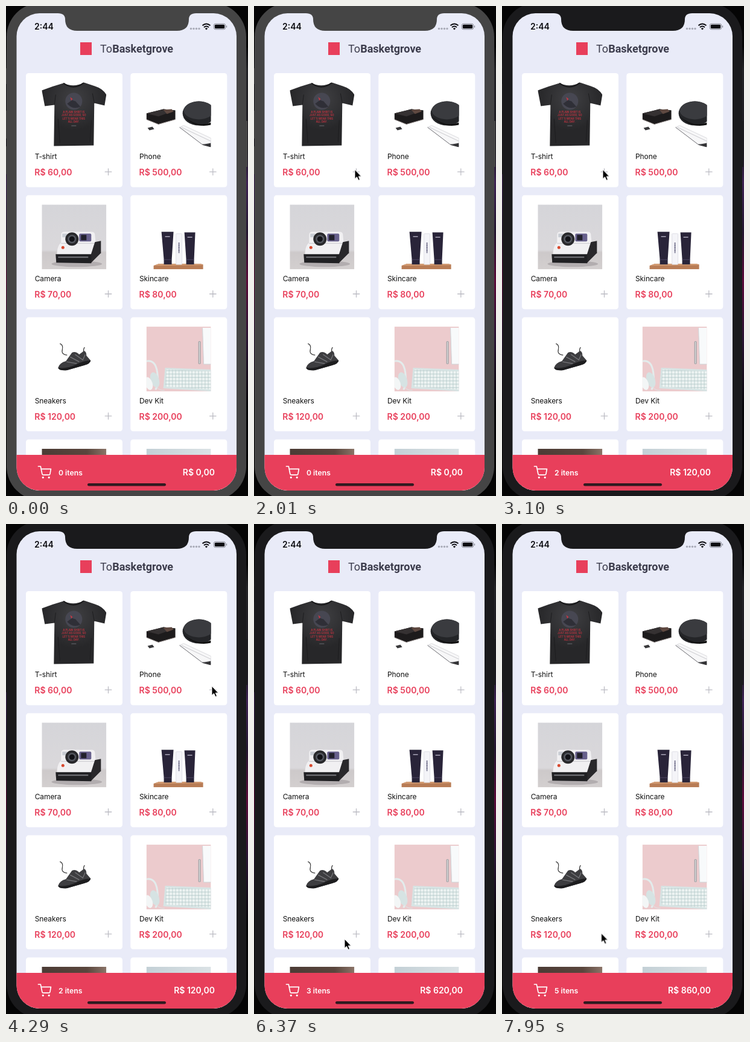
Animation, 401 px wide and 810 px high, one loop 8000 ms. Source, as an HTML page:

```html
<!DOCTYPE html>
<html lang="en">
<head>
<meta charset="utf-8">
<title>Shop</title>
<style>
  html, body { margin: 0; width: 100%; height: 100%; overflow: hidden; background: #060606; }
  #stage { display: block; width: 401px; height: 810px; font-family: Inter, "Open Sans", sans-serif; }
  .brand { font: 400 18px Roboto, sans-serif; fill: #3d3d4d; }
  .bold { font-weight: 700; }
  .clock { font-size: 14px; font-weight: 600; fill: #0c0c10; }
  .name { font-size: 12px; letter-spacing: -.1px; fill: #111; }
  .price { font-size: 14px; font-weight: 600; fill: #e83f5b; }
  .count { font-size: 12.2px; font-weight: 600; fill: #fff; }
  .total { font-size: 14px; font-weight: 600; fill: #fff; text-anchor: end; }
  .print { font-size: 4.3px; font-weight: 700; fill: #b5323f; text-anchor: middle; }
  .plus { stroke: #bcbcc4; stroke-width: 1.3; stroke-linecap: round; }
</style>
</head>
<body>
<svg id="stage" viewBox="0 0 401 810">
  <defs>
    <linearGradient id="desk" x2="0" y2="1">
      <stop offset=".08" stop-color="#050506"/><stop offset=".13" stop-color="#232326"/>
      <stop offset=".3" stop-color="#1d1a22"/><stop offset=".36" stop-color="#3f2354"/>
      <stop offset=".46" stop-color="#241730"/><stop offset=".56" stop-color="#5c0b3a"/>
      <stop offset=".68" stop-color="#2a1533"/><stop offset=".82" stop-color="#060607"/>
    </linearGradient>
    <linearGradient id="wall" x2="0" y2="1">
      <stop offset="0" stop-color="#d5d5d9"/><stop offset=".7" stop-color="#dad8db"/>
      <stop offset=".74" stop-color="#cdc9ca"/><stop offset="1" stop-color="#d3cfcf"/>
    </linearGradient>
    <linearGradient id="wood">
      <stop offset="0" stop-color="#4b3b35"/><stop offset=".7" stop-color="#5a463d"/><stop offset="1" stop-color="#8b7468"/>
    </linearGradient>
    <linearGradient id="mist">
      <stop offset="0" stop-color="#c3d0d6"/><stop offset="1" stop-color="#dbe2e5"/>
    </linearGradient>
    <radialGradient id="cloth" cx=".5" cy=".25">
      <stop offset="0" stop-color="#404043"/><stop offset="1" stop-color="#272729"/>
    </radialGradient>
    <pattern id="keys" width="5.4" height="5.6" patternUnits="userSpaceOnUse">
      <rect width="5.4" height="5.6" fill="#bfd2d2"/><rect x=".5" y=".5" width="4.4" height="4.5" rx=".8" fill="#eef4f3"/>
    </pattern>
    <clipPath id="screen"><rect x="17.5" y="12" width="364.5" height="789" rx="38"/></clipPath>
  </defs>

  <rect width="401" height="810" fill="url(#desk)"/>
  <path d="M0 0H60L0 70ZM401 0H341L401 70ZM0 810H60L0 740ZM401 810H341L401 740Z" fill="#050505"/>
  <g id="body" fill="currentColor">
    <rect x="1" y="-5" width="397" height="822" rx="56"/>
    <path d="M0 103h3v26H0zM0 173h3v46H0zM0 232h3v46H0zM397 190h3v76h-3z"/>
  </g>

  <g clip-path="url(#screen)">
    <rect x="17" y="11" width="366" height="791" fill="#e9ebf8"/>
    <rect x="123" y="60" width="19" height="21" fill="#e83f5b"/>
    <text class="brand" x="156" y="77">To<tspan class="bold">Basketgrove</tspan></text>
    <g id="cards"></g>
    <rect x="17" y="742" width="366" height="60" fill="#e83f5b"/>
    <g fill="none" stroke="#fff" stroke-width="1.7" stroke-linecap="round" stroke-linejoin="round">
      <path d="M53.5 761h3.8l2.6 12.6q.4 1.6 2 1.6h9q1.6 0 2-1.6l1.5-8.2H58.2"/>
      <circle cx="61.3" cy="779.3" r=".8"/><circle cx="71.2" cy="779.3" r=".8"/>
    </g>
    <g id="totals"></g>
    <rect x="135" y="789" width="130" height="4.6" rx="2.3" fill="#301a20"/>
  </g>

  <path id="notch" fill="currentColor" d="M86 10V12Q98 12 98 22Q98 41 118 41H283Q303 41 303 22Q303 12 315 12V10Z"/>
  <text class="clock" x="47" y="39">2:44</text>
  <g fill="#a9abb8">
    <circle cx="306.500" cy="37.500" r="1.700"/><circle cx="311" cy="37.500" r="1.700"/>
    <circle cx="315.500" cy="37.500" r="1.700"/><circle cx="320" cy="37.500" r="1.700"/>
  </g>
  <g fill="none" stroke="#0c0c10" stroke-width="2">
    <path d="M325.500 32.300q6.500-5.600 13 0M328 35.200q4-3.400 8 0"/>
    <path d="M332 39.500l-2.200-2.300q2.200-1.700 4.400 0z" fill="#0c0c10" stroke="none"/>
    <rect x="344.300" y="29.300" width="19.400" height="9.400" rx="2.800" stroke="#8b8d98" stroke-width="1"/>
    <rect x="345.800" y="30.800" width="16.400" height="6.400" rx="1.500" fill="#0c0c10" stroke="none"/>
    <path d="M365.500 32.500v3" stroke="#8b8d98" stroke-width="1.300"/>
  </g>

  <path id="cursor" d="M0 0V15.300L3.500 12.100L6 17.600L8.500 16.500L6.200 11.200H10.800Z" fill="#000" stroke="#fff" stroke-width="1" stroke-linejoin="round"/>
</svg>

<script>
const LOOP = 8000;
const $ = id => document.getElementById(id);

const art = {
  shirt: `
    <path d="M36 1Q53 9 70 0L88 6Q101 10 107 20L104 38L87 34L86 104L20 105L21 37L5 39L0 13Q18 6 36 1Z" fill="url(#cloth)"/>
    <path d="M36 1Q53 14 70 0" fill="none" stroke="#19191b" stroke-width="2"/>
    <path d="M21 37L23 20M87 34L84 18M30 100L27 60M80 98L82 62" stroke="#1d1d1f" fill="none"/>
    <circle cx="53" cy="31" r="14" fill="#474752"/>
    <path d="M42 35L50 29L56 31L64 40Q52 46 42 35Z" fill="#2f2f37"/>
    <path d="M47 24l4 3l-2 3z" fill="#c23845"/>
    <g class="print"><text x="53" y="50">A PLAIN SHIRT IS</text><text x="53" y="55.500">JUST AS GOOD, SO</text>
    <text x="53" y="61">LET'S WEAR THIS</text><text x="53" y="66.500">ALL DAY.</text></g>
    <path d="M49 71.500h8" stroke="#6b6b70"/>`,
  phone: `
    <path d="M0 51L28 44L48 46V61L20 69L0 61Z" fill="#1d1b1c"/>
    <path d="M0 51L28 44L48 46L20 56Z" fill="#353132"/><path d="M28 45l14-1l3 4l-11 4z" fill="#5f4941"/>
    <path d="M0 61L20 69L48 61" fill="none" stroke="#8d8583"/>
    <path d="M2 75l8-2l3 4l-8 2z" fill="#3a3a3c"/>
    <ellipse cx="87" cy="51" rx="27" ry="20" fill="#242528"/><ellipse cx="87" cy="46" rx="25" ry="15" fill="#3a3b3f"/>
    <path d="M62 56Q84 75 107 66V70Q80 76 62 56Z" fill="#111"/>
    <path d="M55 74L62 71L107 92V100L92 102Z" fill="#f7f7f8" stroke="#d2d2d6" stroke-width=".8"/>
    <path d="M55 74L92 102L107 104" stroke="#77777c" fill="none"/><path d="M58 74L107 97" stroke="#c9c9ce"/>
    <path d="M92 103L107 100V107Z" fill="#333336"/>`,
  camera: `
    <rect width="107" height="107" fill="url(#wall)"/><ellipse cx="58" cy="98" rx="42" ry="5" fill="#b2adaf"/>
    <path d="M32 50Q32 45 38 45H82Q88 45 88 50L91 80L80 86H25Q25 68 32 63Z" fill="#f1f0f2"/>
    <path d="M32 64H88" stroke="#c9c7cc"/>
    <path d="M88 62L98 60V80L81 97V84Z" fill="#29282b"/>
    <path d="M23 82H82V97L24 96Z" fill="#202023"/><path d="M27 87H77" stroke="#77777c" stroke-width="2"/>
    <rect x="34" y="48" width="8" height="6" fill="#c9cdd4"/><rect x="62" y="48" width="20" height="13" rx="2" fill="#67608c"/>
    <rect x="65" y="50" width="9" height="9" fill="#22212c"/>
    <circle cx="50" cy="57" r="11" fill="#29292c"/><circle cx="50" cy="57" r="7" fill="#54575f"/><circle cx="50" cy="57" r="4.500" fill="#121217"/>
    <circle cx="35" cy="71" r="2.500" fill="#d8492f"/>`,
  skin: `
    <path d="M12 101L20 98H90L94 99V107H12Z" fill="#b87c55"/><path d="M12 101L20 98H90L94 100Z" fill="#d39c73"/>
    <path d="M25 45H45L42 91V99H29V91Z" fill="#292439"/><path d="M63 46H81L79 91V99H66V91Z" fill="#292439"/>
    <path d="M29 91H42M66 91H79" stroke="#4a4460"/>
    <path d="M31 53h8M68 54h8" stroke="#aaa6b8" stroke-width="1.500"/>
    <rect x="49" y="48" width="10" height="51" rx="1" fill="#f4f4f8" stroke="#d5d5de" stroke-width=".7"/>
    <path d="M54 63V80" stroke="#5a5877" stroke-width="2" stroke-dasharray="2 .6"/>`,
  shoe: `
    <path d="M30 28Q36 30 34 38T42 47M70 43Q68 38 71 34" fill="none" stroke="#333" stroke-width="1.200"/>
    <path d="M27 68Q29 60 40 57L50 43Q56 40 62 46L70 40Q74 41 74 48L81 56Q80 61 70 64L42 72Q28 73 27 68Z" fill="#3d3d40"/>
    <path d="M27 68Q42 70 56 63T81 56Q81 61 70 64L42 72Q28 73 27 68Z" fill="#1d1d1f"/>
    <path d="M41 58L58 61M47 50L62 58M55 46L68 55L72 46" fill="none" stroke="#77777b" stroke-width="1.200"/>`,
  desk: `
    <rect width="107" height="107" fill="#eccbcd"/>
    <path d="M93 2H107V62H95Z" fill="#f8fafb"/><path d="M93 2L95 62H107" fill="none" stroke="#cfd5d8"/>
    <rect x="86" y="24" width="4" height="38" rx="1.500" fill="#a5a5a8"/><path d="M88 25V61" stroke="#e8e8e8"/>
    <path d="M0 57Q15 54 18 75T15 104" fill="none" stroke="#e3ecec" stroke-width="3"/>
    <ellipse cx="14" cy="88" rx="7" ry="13" fill="#d6e3e3" transform="rotate(-18 14 88)"/>
    <ellipse cx="4" cy="94" rx="6" ry="11" fill="#f3f6f6" transform="rotate(-18 4 94)"/>
    <path d="M16 98Q22 107 30 105" fill="none" stroke="#dbe4e4"/>
    <path d="M31 68L107 71V107L28 102Z" fill="#d7e4e4"/>
    <path d="M33 71L107 74V104L31 99Z" fill="url(#keys)"/>`,
  wood: `<rect width="107" height="107" fill="url(#wood)"/>`,
  mist: `<rect width="107" height="107" fill="url(#mist)"/>`
};

const products = [
  ["T-shirt", 60, "shirt"], ["Phone", 500, "phone"],
  ["Camera", 70, "camera"], ["Skincare", 80, "skin"],
  ["Sneakers", 120, "shoe"], ["Dev Kit", 200, "desk"],
  ["Desk", 90, "wood"], ["Lamp", 40, "mist"]
];

const money = n => `R$ ${n},00`;

$("cards").innerHTML = products.map(([name, price, pic], i) => {
  const x = 33 + (i % 2) * 173.3, y = 111 + (i >> 1) * 201.8;
  return `<g transform="translate(${x} ${y})">
    <rect width="160" height="188.500" rx="4.500" fill="#fff"/>
    <svg x="26.300" y="15.500" width="107" height="107">${art[pic]}</svg>
    <text class="name" x="14.700" y="142.300">${name}</text>
    <text class="price" x="14.300" y="169">${money(price)}</text>
    <path class="plus" id="plus${i}" d="M131.200 163.200h10.600M136.500 157.900v10.600"/>
  </g>`;
}).join("");

// Steps that hold until the next one: [ms, properties]
function hold(el, rows) {
  const last = rows[rows.length - 1];
  const frames = [...rows, [LOOP, last[1]]].map(([t, props]) =>
    ({ offset: t / LOOP, easing: "steps(1, end)", ...props }));
  el.animate(frames, { duration: LOOP, iterations: Infinity });
}

// Items added to the cart: [ms, product]
const adds = [[2570, 0], [2860, 0], [4620, 1], [7600, 4], [7950, 4]];
const states = [[0, 0]];
adds.forEach(([t, p], i) => states.push([t, states[i][1] + products[p][1]]));
$("totals").innerHTML = states.map(([, sum], i) =>
  `<g><text class="count" x="87" y="775.500">${i} itens</text><text class="total" x="346" y="776.300">${money(sum)}</text></g>`).join("");
states.forEach(([t], i) => {
  const rows = t ? [[0, { visibility: "hidden" }]] : [];
  rows.push([t, { visibility: "visible" }]);
  if (states[i + 1]) rows.push([states[i + 1][0], { visibility: "hidden" }]);
  hold($("totals").children[i], rows);
});

// Press feedback: [ms, opacity]
const presses = {
  plus0: [[2570, .2], [2720, .6], [2860, .2], [2980, .6], [3100, 1]],
  plus1: [[4500, .2], [4740, .6], [4860, 1]],
  plus4: [[7360, .2], [7720, .6], [7840, .1]]
};
for (const id in presses)
  hold($(id), [[0, 1], ...presses[id]].map(([t, opacity]) => [t, { opacity }]));

// The window gains focus
for (const id of ["body", "notch"])
  hold($(id), [[0, { color: "#454545" }], [2160, { color: "#1a1a1c" }]]);

// Pointer strokes: start, end, steps, then a quadratic curve
const strokes = [
  [500, 800, 4, [342, 141], [300, 138], [262, 143]],
  [1010, 1010, 1, [240.500, 147], [240, 147], [240, 147]],
  [1160, 1750, 6, [172, 195], [150.700, 276], [167, 270.500]],
  [3570, 4290, 7, [180, 276], [255, 292], [341, 268]],
  [5100, 5450, 4, [341, 272], [338, 290], [331, 316]],
  [5600, 6370, 8, [328.500, 400.500], [45, 688], [150, 686]],
  [6460, 7180, 9, [158, 686], [185, 676], [164.500, 676.500]]
];
const path = [[0, { visibility: "hidden", transform: "translate(342px, 141px)" }]];
for (const [t0, t1, n, a, b, c] of strokes)
  for (let i = 0; i < n; i++) {
    const u = i / Math.max(1, n - 1), v = 1 - u;
    const [x, y] = [0, 1].map(k => v * v * a[k] + 2 * u * v * b[k] + u * u * c[k]);
    path.push([t0 + (t1 - t0) * u, { visibility: "visible", transform: `translate(${x}px, ${y}px)` }]);
  }
hold($("cursor"), path);
</script>
</body>
</html>
```
